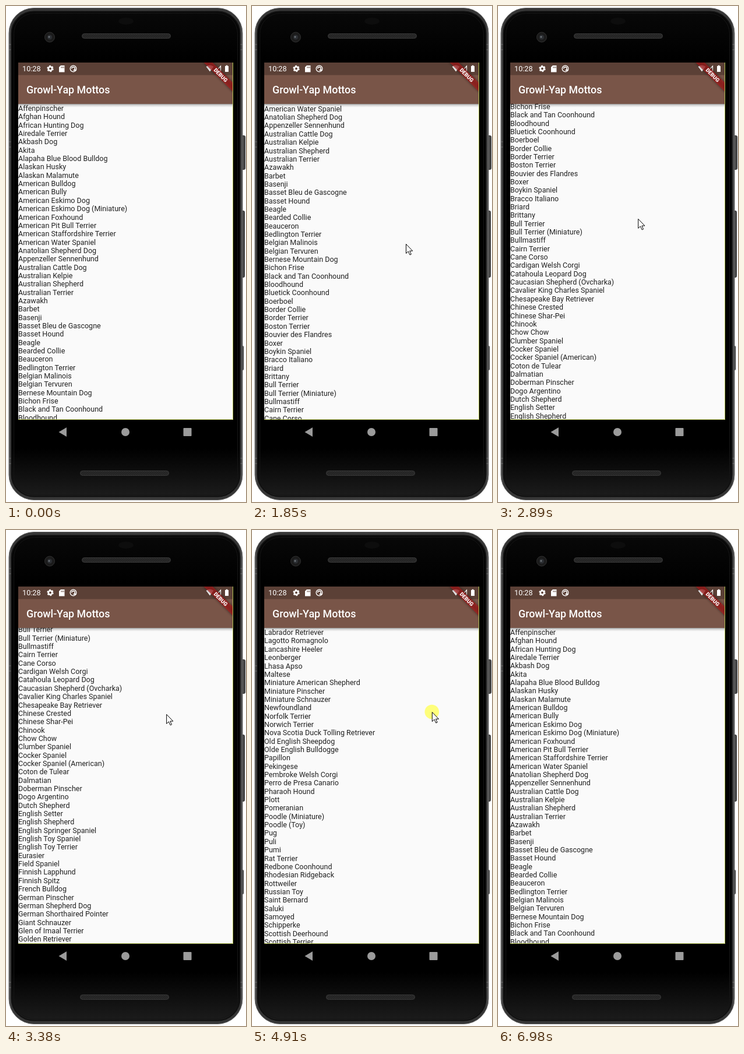
Animation, 412 px wide and 851 px high, one loop 7.57 s. Source, as an HTML page:

```html
<!DOCTYPE html>
<html lang="en">
<head>
<meta charset="utf-8">
<title>Dog breeds</title>
<style>
html, body { margin: 0; width: 100%; height: 100%; overflow: hidden; background: #fff; }
svg { display: block; width: 412px; height: 851px; }
text { font-family: Roboto, sans-serif; white-space: pre; }
#list text { font-size: 12.52px; fill: #212121; }
</style>
</head>
<body>
<svg viewBox="0 0 412 851">
  <defs>
    <linearGradient id="metal" x2="1" y2="0">
      <stop offset="0" stop-color="#555"/><stop offset=".012" stop-color="#353535"/>
      <stop offset=".5" stop-color="#3c3c3c"/><stop offset=".988" stop-color="#353535"/>
      <stop offset="1" stop-color="#5a5a5a"/>
    </linearGradient>
    <linearGradient id="glass" x2="0" y2="1">
      <stop offset="0" stop-color="#080808"/><stop offset=".1" stop-color="#000"/>
      <stop offset=".9" stop-color="#000"/><stop offset="1" stop-color="#1c1c1c"/>
    </linearGradient>
    <linearGradient id="shade" x2="0" y2="1">
      <stop offset="0" stop-opacity=".38"/><stop offset=".4" stop-opacity=".14"/>
      <stop offset="1" stop-opacity="0"/>
    </linearGradient>
    <pattern id="mesh" width="3" height="3" patternUnits="userSpaceOnUse">
      <rect width="3" height="3" fill="#1c1c1c"/><path d="M0 3L3 0" stroke="#444" stroke-width=".8"/>
    </pattern>
    <filter id="blur" x="-20%" y="-60%" width="140%" height="220%"><feGaussianBlur stdDeviation="2"/></filter>
    <clipPath id="screen"><rect x="21" y="97" width="369" height="613"/></clipPath>
    <clipPath id="view"><rect x="21" y="168" width="369" height="541.5"/></clipPath>
  </defs>

  <!-- Phone -->
  <g fill="#484848" stroke="#292929">
    <rect x="402" y="222.500" width="8.500" height="58" rx="2"/>
    <rect x="402" y="351.500" width="7.500" height="114" rx="2"/>
    <rect x="402" y="583.500" width="5.500" height="41" rx="1"/>
  </g>
  <rect x="5" y="3.500" width="401" height="844" rx="43" fill="url(#metal)" stroke="#626262"/>
  <path d="M5 66h6M5 75h6M400 66h6M400 75h6M5 233h5M5 242h5M5 776h5M5 785h5M401 776h5M401 785h5" stroke="#777"/>
  <rect x="9.500" y="9.500" width="392" height="832" rx="38" fill="url(#glass)" stroke="#101010" stroke-width="2"/>
  <rect x="13.500" y="12.500" width="384" height="826" rx="35" fill="none" stroke="#161616"/>
  <ellipse cx="206" cy="26" rx="13" ry="6" fill="#0d0d0d"/>
  <circle cx="75" cy="53.500" r="8.500" fill="#1b1b1b" stroke="#303030"/>
  <circle cx="75" cy="53.500" r="4" fill="#2c2f33"/>
  <circle cx="74" cy="53" r="1.500" fill="#70757a"/>
  <rect x="130.500" y="47.500" width="152" height="8" rx="4" fill="url(#mesh)" stroke="#383838"/>
  <rect x="127.500" y="797.500" width="152" height="8" rx="4" fill="url(#mesh)" stroke="#383838"/>
  <g fill="#9b9b9b">
    <path d="M90.500 731L104 723v16z"/>
    <circle cx="205" cy="731" r="7"/>
    <rect x="304.500" y="724" width="14" height="14" rx="1"/>
  </g>

  <!-- Screen -->
  <g clip-path="url(#screen)">
    <rect x="21" y="97" width="369" height="613" fill="#fafafa"/>
    <g clip-path="url(#view)">
      <g id="list"></g>
      <circle id="top" cx="205.500" r="276" fill="#795548"/>
      <circle id="end" cx="205.500" r="276" fill="#795548"/>
    </g>
    <rect x="21" y="168" width="369" height="6" fill="url(#shade)"/>
    <rect x="21" y="97" width="369" height="71" fill="#795548"/>
    <rect x="21" y="97" width="369" height="21.500" fill="#5b4036"/>
    <text x="35" y="150.300" font-size="17.890" font-weight="500" fill="#fff">Growl-Yap Mottos</text>

    <g fill="#fff">
      <text x="28" y="112.300" font-size="12.700">10:28</text>
      <circle cx="76" cy="107.500" r="3.200" fill="none" stroke="#fff" stroke-width="2.600"/>
      <circle cx="76" cy="107.500" r="4.900" fill="none" stroke="#fff" stroke-width="1.600" stroke-dasharray="2.800 2.330"/>
      <path d="M94 102h6.500v11.500h-9.500v-8.500z"/>
      <path d="M95 104v2.500M97 104v2.500M99 104v2.500" stroke="#5b4036" stroke-width=".9"/>
      <circle cx="115.500" cy="107.500" r="5.300" fill="none" stroke="#fff" stroke-width="1.400"/>
      <path d="M112.700 107.500a2.800 2.800 0 1 1 2.800 2.800h4l-2 -2" fill="none" stroke="#fff" stroke-width="1.500"/>
      <path d="M343.500 104q6.500 -5 13 0l-6.500 8.500z"/>
      <path d="M360.500 112l8 -9v9z" fill="none" stroke="#fff" stroke-width="1.200"/>
      <path d="M376 103h1.600v-1.300h2.800v1.300h1.600v10h-6z"/>
    </g>
    <g transform="translate(390 97) rotate(45)">
      <rect x="-35.800" y="25" width="71.600" height="10.700" opacity=".5" filter="url(#blur)"/>
      <rect x="-35.800" y="25" width="71.600" height="10.700" fill="#b71c1c" opacity=".63"/>
      <text y="33.600" font-size="9.100" font-weight="900" text-anchor="middle" fill="#fff">DEBUG</text>
    </g>
    <path d="M389.500 97V709.500H21" fill="none" stroke="#b3c253"/>
  </g>

  <g id="cursor">
    <circle id="touch" r="12.300" fill="#ffff50" opacity=".75"/>
    <path d="M.5 .5V16.500L4.200 13L7 19L9.300 18L6.700 12.200H11.700z" fill="#fff" stroke="#000"/>
  </g>
</svg>

<script>
const breeds = `Affenpinscher,Afghan Hound,African Hunting Dog,Airedale Terrier,Akbash Dog,Akita,
Alapaha Blue Blood Bulldog,Alaskan Husky,Alaskan Malamute,American Bulldog,American Bully,
American Eskimo Dog,American Eskimo Dog (Miniature),American Foxhound,American Pit Bull Terrier,
American Staffordshire Terrier,American Water Spaniel,Anatolian Shepherd Dog,Appenzeller Sennenhund,
Australian Cattle Dog,Australian Kelpie,Australian Shepherd,Australian Terrier,Azawakh,Barbet,Basenji,
Basset Bleu de Gascogne,Basset Hound,Beagle,Bearded Collie,Beauceron,Bedlington Terrier,
Belgian Malinois,Belgian Tervuren,Bernese Mountain Dog,Bichon Frise,Black and Tan Coonhound,Bloodhound,
Bluetick Coonhound,Boerboel,Border Collie,Border Terrier,Boston Terrier,Bouvier des Flandres,Boxer,
Boykin Spaniel,Bracco Italiano,Briard,Brittany,Bull Terrier,Bull Terrier (Miniature),Bullmastiff,
Cairn Terrier,Cane Corso,Cardigan Welsh Corgi,Catahoula Leopard Dog,Caucasian Shepherd (Ovcharka),
Cavalier King Charles Spaniel,Chesapeake Bay Retriever,Chinese Crested,Chinese Shar-Pei,Chinook,
Chow Chow,Clumber Spaniel,Cocker Spaniel,Cocker Spaniel (American),Coton de Tulear,Dalmatian,
Doberman Pinscher,Dogo Argentino,Dutch Shepherd,English Setter,English Shepherd,
English Springer Spaniel,English Toy Spaniel,English Toy Terrier,Eurasier,Field Spaniel,
Finnish Lapphund,Finnish Spitz,French Bulldog,German Pinscher,German Shepherd Dog,
German Shorthaired Pointer,Giant Schnauzer,Glen of Imaal Terrier,Golden Retriever,Gordon Setter,
Great Dane,Great Pyrenees,Greyhound,Griffon Bruxellois,Harrier,Havanese,Irish Setter,Irish Terrier,
Irish Wolfhound,Italian Greyhound,Japanese Chin,Japanese Spitz,Keeshond,Komondor,Kooikerhondje,Kuvasz,
Labrador Retriever,Lagotto Romagnolo,Lancashire Heeler,Leonberger,Lhasa Apso,Maltese,
Miniature American Shepherd,Miniature Pinscher,Miniature Schnauzer,Newfoundland,Norfolk Terrier,
Norwich Terrier,Nova Scotia Duck Tolling Retriever,Old English Sheepdog,Olde English Bulldogge,
Papillon,Pekingese,Pembroke Welsh Corgi,Perro de Presa Canario,Pharaoh Hound,Plott,Pomeranian,
Poodle (Miniature),Poodle (Toy),Pug,Puli,Pumi,Rat Terrier,Redbone Coonhound,Rhodesian Ridgeback,
Rottweiler,Russian Toy,Saint Bernard,Saluki,Samoyed,Schipperke,Scottish Deerhound,Scottish Terrier,
Shetland Sheepdog,Shiba Inu,Shih Tzu,Shiloh Shepherd,Siberian Husky,Silky Terrier,Smooth Fox Terrier,
Soft Coated Wheaten Terrier,Spanish Water Dog,Spinone Italiano,Staffordshire Bull Terrier,
Standard Schnauzer,Swedish Vallhund,Thai Ridgeback,Tibetan Mastiff,Tibetan Spaniel,Tibetan Terrier,
Toy Fox Terrier,Treeing Walker Coonhound,Vizsla,Weimaraner,Welsh Springer Spaniel,
West Highland White Terrier,Whippet,White Shepherd,Wire Fox Terrier,Wirehaired Pointing Griffon,
Wirehaired Vizsla,Xoloitzcuintli,Yorkshire Terrier`.replace(/\n/g, '').split(',');

const LOOP = 7570, ROW = 14.347, MAX = 1926.3;
const $ = id => document.getElementById(id);
const [list, topGlow, endGlow, cursor, touch] = ['list', 'top', 'end', 'cursor', 'touch'].map($);

breeds.forEach((name, i) => {
  const row = document.createElementNS('http://www.w3.org/2000/svg', 'text');
  row.setAttribute('x', 21);
  row.setAttribute('y', 180 + i * ROW);
  row.textContent = name;
  list.append(row);
});

// [time, x, y] of the pointer
const path = [
  [260, 354, 851], [980, 282, 644], [1080, 280, 642], [1500, 228, 560], [1740, 258, 415],
  [1850, 264, 408], [2420, 221, 470], [2500, 224, 438], [2640, 245, 330], [2720, 252, 310],
  [3120, 222, 450], [3340, 264, 325], [3380, 275, 316], [3480, 284, 305], [3900, 250, 450],
  [4130, 322, 343], [4260, 326, 337], [4700, 262, 440], [4920, 310, 310], [5020, 318, 300],
  [5380, 270, 430], [5600, 290, 290], [5700, 288, 284], [5820, 272, 286], [5880, 272, 288],
  [6100, 282, 600], [6280, 290, 752]
];
// [time, list offset]
const scroll = [
  [1500, 0], [1740, 170], [1850, 228.5], [2100, 268], [2440, 275], [2500, 297.3], [2640, 420],
  [2800, 490], [3140, 540], [3340, 670], [3380, 706.9], [3550, 800], [3920, 870], [4130, 1090],
  [4260, 1200], [4450, 1280], [4720, 1310], [4920, 1500], [5100, 1640], [5400, 1720],
  [5560, MAX], [5890, MAX], [6100, 1620], [6250, 900], [6440, 0]
];
const presses = [[1500, 1740], [2420, 2640], [3120, 3340], [3900, 4130], [4700, 4920], [5380, 5600], [5820, 6100]];

// Monotone cubic through the keys
function at(keys, t, c) {
  const n = keys.length - 1;
  if (t <= keys[0][0]) return keys[0][c];
  if (t >= keys[n][0]) return keys[n][c];
  const i = keys.findIndex(k => k[0] > t) - 1;
  const slope = j => j < 0 || j >= n ? 0 : (keys[j + 1][c] - keys[j][c]) / (keys[j + 1][0] - keys[j][0]);
  const tangent = j => {
    const a = slope(j - 1), b = slope(j);
    return a * b > 0 ? 2 * a * b / (a + b) : 0;
  };
  const a = keys[i], b = keys[i + 1], h = b[0] - a[0], u = (t - a[0]) / h, v = 1 - u;
  return a[c] * v * v * (1 + 2 * u) + b[c] * u * u * (1 + 2 * v)
    + h * u * v * (v * tangent(i) - u * tangent(i + 1));
}

function glow(el, t, start, length, edge, dir) {
  const u = (t - start) / length;
  const k = u < 0 || u > 1 ? 0 : Math.min(1, u * 5) * (1 - u);
  el.setAttribute('cy', edge + dir * (75 * Math.sqrt(k) - 276));
  el.setAttribute('opacity', .22 * k);
}

function draw(now) {
  const t = now % LOOP;
  list.setAttribute('transform', `translate(0 ${-at(scroll, t, 1)})`);
  cursor.setAttribute('transform', `translate(${at(path, t, 1)} ${at(path, t, 2)})`);
  cursor.style.display = t >= 260 && t < 6400 ? '' : 'none';
  touch.style.display = presses.some(([a, b]) => t >= a && t < b) ? '' : 'none';
  glow(topGlow, t, 6420, 560, 168, 1);
  glow(endGlow, t, 5540, 330, 709.5, -1);
}

const start = performance.now();
function tick() {
  draw(performance.now() - start);
  requestAnimationFrame(tick);
}
tick();
</script>
</body>
</html>
```
